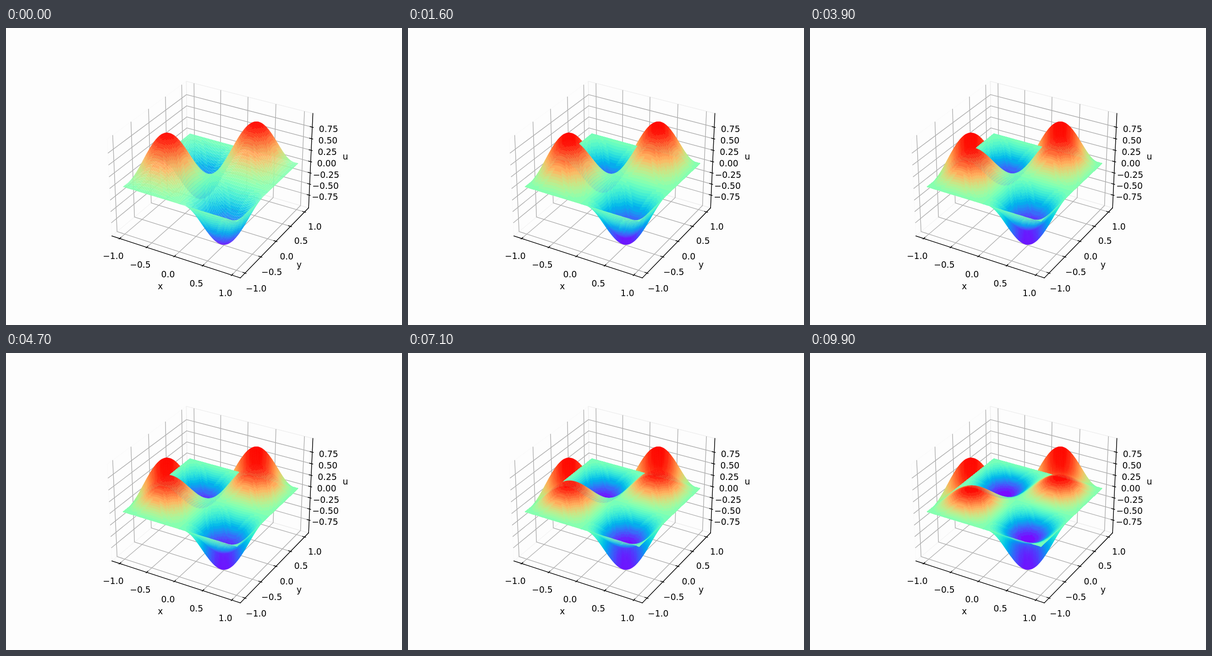
Write an HTML page with a canvas that moves like this. It is 864 by 648 pixels and loops after 10000 ms.

```html
<!DOCTYPE html>
<html lang="en">
<head>
<meta charset="utf-8">
<title>Decaying surface</title>
<style>
  html, body { margin: 0; width: 100%; height: 100%; overflow: hidden; background: #fdfdfd; }
  svg, canvas { position: absolute; left: 0; top: 0; width: 864px; height: 648px; }
  polyline { fill: none; stroke-width: 1.5; }
  .grid { stroke: #b0b0b0; }
  .axis { stroke: #000; stroke-linecap: square; }
  text { font: 18.75px "DejaVu Sans", sans-serif; text-anchor: middle; fill: #000; }
</style>
</head>
<body>
<svg id="axes" viewBox="0 0 864 648"></svg>
<canvas id="plot" width="864" height="648"></canvas>
<script>
const LOOP = 10000, STEP = 100, CELLS = 100, LEVELS = 32;

// Box half sizes, and the scale from data to box units
const HALF = 4 / 7, HALF_Z = 3 / 7;
const SCALE = HALF / 1.1;
const EDGE = HALF * 25 / 24, EDGE_Z = HALF_Z * 25 / 24;
const PAD = HALF / 6, PAD_Z = HALF_Z / 6;

// Perspective camera: elevation 30, azimuth -60, distance 10
const C = Math.sqrt(3) / 2;
function project(x, y, z) {
  const depth = 10 - (C / 2 * x - 0.75 * y + 0.5 * z);
  const zoom = 2697.08 / depth;
  return [
    449.54 + zoom * (C * x + 0.5 * y),
    320.5 - zoom * (-0.25 * x + C / 2 * y + C * z),
    depth
  ];
}

const svg = document.getElementById('axes');
function add(tag, attrs, content) {
  const node = document.createElementNS('http://www.w3.org/2000/svg', tag);
  for (const key in attrs) node.setAttribute(key, attrs[key]);
  if (content) node.textContent = content;
  svg.appendChild(node);
}
function line(cls, points, stroke) {
  const flat = points.map(p => project(...p).slice(0, 2).map(v => v.toFixed(2)).join()).join(' ');
  add('polyline', stroke ? { points: flat, stroke } : { points: flat, class: cls });
}
function label(point, dy, content) {
  const [x, y] = project(...point);
  add('text', { x: x.toFixed(1), y: Math.round(y + dy) }, content);
}

function drawAxes() {
  const E = EDGE, Z = EDGE_Z;
  const ticks = [-1, -0.5, 0, 0.5, 1];
  const zTicks = [-0.75, -0.5, -0.25, 0, 0.25, 0.5, 0.75];
  const format = (v, digits) => (v < 0 ? '\u2212' : '') + Math.abs(v).toFixed(digits);

  // Pane outlines
  line('', [[-E, -E, -Z], [-E, E, -Z], [-E, E, Z], [-E, -E, Z], [-E, -E, -Z]], '#fafafa');
  line('', [[-E, -E, -Z], [E, -E, -Z], [E, E, -Z], [-E, E, -Z], [-E, -E, -Z]], '#f5f5f5');
  line('', [[-E, E, -Z], [E, E, -Z], [E, E, Z], [-E, E, Z], [-E, E, -Z]], '#eeeeee');

  for (const v of ticks) {
    const t = v * SCALE;
    line('grid', [[t, E, Z], [t, E, -Z], [t, -E, -Z]]);
    line('grid', [[-E, t, Z], [-E, t, -Z], [E, t, -Z]]);
  }
  for (const v of zTicks) {
    const t = v * HALF_Z;
    line('grid', [[-E, -E, t], [-E, E, t], [E, E, t]]);
  }

  line('axis', [[-E, -E, -Z], [E, -E, -Z]]);
  line('axis', [[E, -E, -Z], [E, E, -Z]]);
  line('axis', [[E, E, -Z], [E, E, Z]]);

  const out = E + 0.1 * PAD, inner = E - 0.2 * PAD;
  const far = E + 1.037 * PAD, low = -Z - 1.037 * PAD_Z;
  for (const v of ticks) {
    const t = v * SCALE, name = format(v, 1);
    line('axis', [[t, -out, -Z], [t, -inner, -Z]]);
    line('axis', [[out, t, -Z], [inner, t, -Z]]);
    label([t, -far, low], 15, name);
    label([far, t, low], 15, name);
  }
  for (const v of zTicks) {
    const t = v * HALF_Z;
    line('axis', [[out, E, t], [inner, E, t]]);
    label([far, far, t], 15, format(v, 2));
  }

  const side = E + 2.255 * PAD, under = -Z - 2.255 * PAD_Z;
  label([0, -side, under], 5.3, 'x');
  label([side, 0, under], 5.3, 'y');
  label([side, side, 0], 5.3, 'u');
}

// Rainbow colour map, from violet to red
function rainbow(v) {
  const rgb = [Math.min(1, Math.abs(2 * v - 0.5)), Math.sin(Math.PI * v), Math.cos(Math.PI * v / 2)];
  return 'rgb(' + rgb.map(c => Math.round(255 * c)).join() + ')';
}
const palette = Array.from({ length: LEVELS }, (_, i) => rainbow((i + 0.5) / LEVELS));

const ctx = document.getElementById('plot').getContext('2d', { willReadFrequently: true });
const ROW = CELLS + 1;
const node = i => 2 * i / CELLS - 1;
const wave = Array.from({ length: ROW }, (_, i) => Math.sin(Math.PI * node(i)));
const px = new Float64Array(ROW * ROW), py = px.slice(), depth = px.slice();
const quads = [];
for (let j = 0; j < CELLS; j++) {
  for (let i = 0; i < CELLS; i++) {
    const mean = (wave[i] + wave[i + 1]) * (wave[j] + wave[j + 1]) / 4;
    const level = Math.min(LEVELS - 1, Math.floor((mean + 1) / 2 * LEVELS));
    quads.push({ a: j * ROW + i, color: palette[level], depth: 0 });
  }
}

function drawSurface(amplitude) {
  for (let j = 0, k = 0; j < ROW; j++) {
    for (let i = 0; i < ROW; i++, k++) {
      const u = amplitude * wave[i] * wave[j];
      [px[k], py[k], depth[k]] = project(node(i) * SCALE, node(j) * SCALE, u * HALF_Z);
    }
  }
  for (const q of quads) {
    q.depth = depth[q.a] + depth[q.a + 1] + depth[q.a + ROW] + depth[q.a + ROW + 1];
  }
  quads.sort((p, q) => q.depth - p.depth);
  for (const { a, color } of quads) {
    const b = a + 1, c = b + ROW, d = a + ROW;
    ctx.fillStyle = color;
    ctx.beginPath();
    ctx.moveTo(px[a], py[a]);
    ctx.lineTo(px[b], py[b]);
    ctx.lineTo(px[c], py[c]);
    ctx.lineTo(px[d], py[d]);
    ctx.fill();
  }
}

// Each step lays a flatter surface over all earlier ones
let drawn = -1;
function show(now) {
  const step = Math.floor(now % LOOP / STEP);
  if (step < drawn) {
    ctx.clearRect(0, 0, 864, 648);
    drawn = -1;
  }
  while (drawn < step) {
    drawn++;
    drawSurface(Math.exp(-drawn / 100));
  }
}
function tick() {
  show(performance.now());
  requestAnimationFrame(tick);
}

drawAxes();
tick();
</script>
</body>
</html>
```
